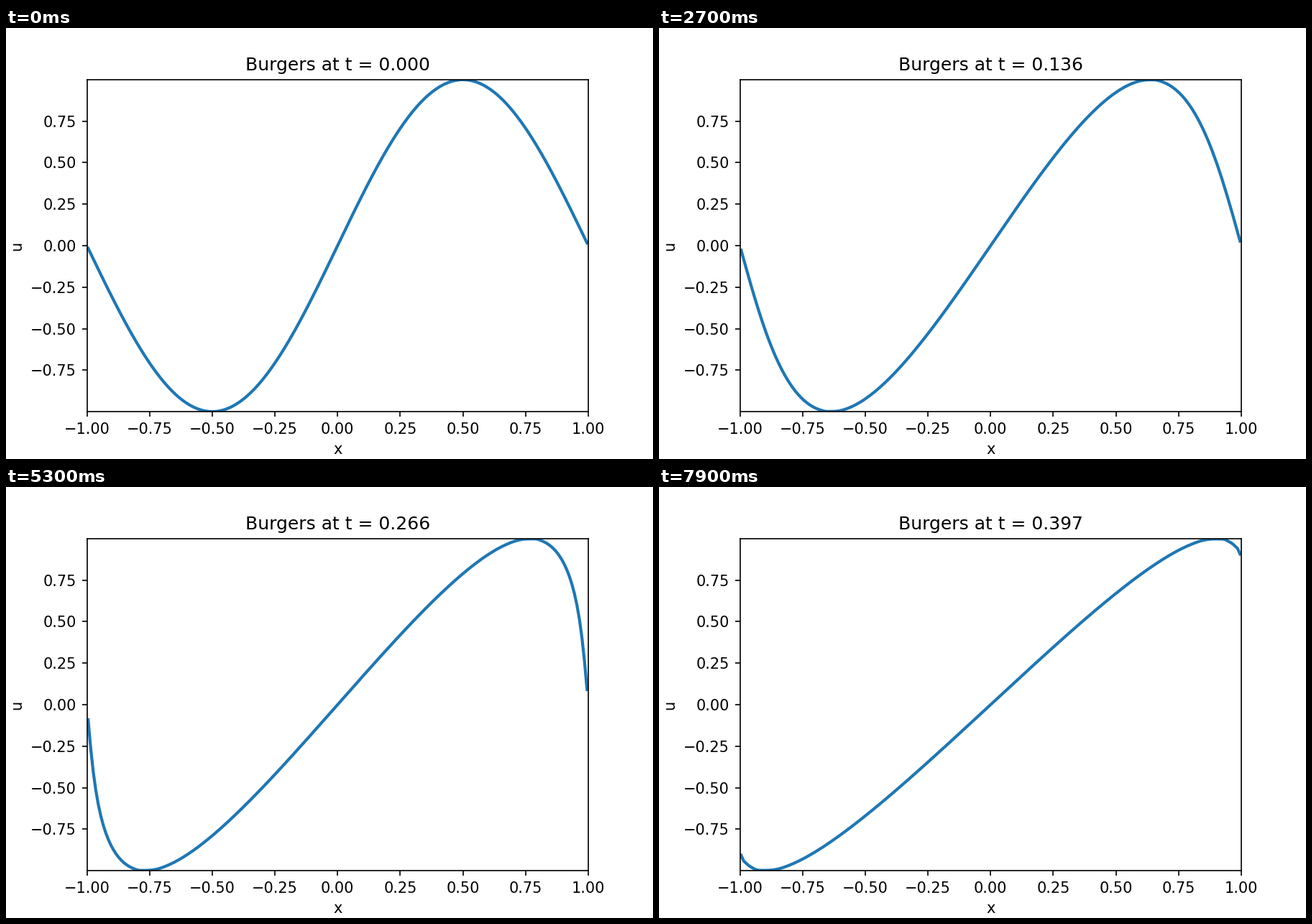
Animation of 900x600 px, one loop 8000 ms. Source, as a matplotlib script:

```python
import numpy as np
import matplotlib.pyplot as plt
from matplotlib.animation import FuncAnimation

FRAMES = 80
CELLS = 199
CFL = 0.5

edges = np.linspace(-1, 1, CELLS + 1)
x = 0.5 * (edges[1:] + edges[:-1])
dx = edges[1] - edges[0]
dt = CFL * dx


def step(u):
    """Advance periodic inviscid Burgers flow by one limited Lax-Wendroff step."""
    right = np.roll(u, -1)
    jump = right - u
    speed = 0.5 * (u + right)
    upwind = np.where(speed >= 0, u, right)
    behind = np.where(speed >= 0, np.roll(jump, 1), np.roll(jump, -1))
    safe = np.where(np.abs(jump) < 1e-12, 1e-12, jump)
    limiter = np.clip(2 * behind / safe, 0, 1)
    a = np.abs(speed)
    flux = 0.5 * upwind**2 + 0.5 * a * (1 - a * CFL) * limiter * jump
    return u - CFL * (flux - np.roll(flux, 1))


states = [np.sin(np.pi * x)]
while len(states) < FRAMES:
    states.append(step(states[-1]))

fig, ax = plt.subplots(figsize=(6, 4), dpi=150)
line, = ax.plot(x, states[0], color="#1f77b4", lw=2)
ax.set_xlim(-1, 1)
ax.set_ylim(states[0].min(), states[0].max())
ax.set_xlabel("x")
ax.set_ylabel("u")
title = ax.set_title("Burgers at t = 0.000")


def draw(i):
    line.set_ydata(states[i])
    title.set_text(f"Burgers at t = {i * dt:.3f}")
    return line, title


anim = FuncAnimation(fig, draw, frames=FRAMES, interval=100, repeat=True,
                     repeat_delay=0, blit=False)
plt.show()
```
